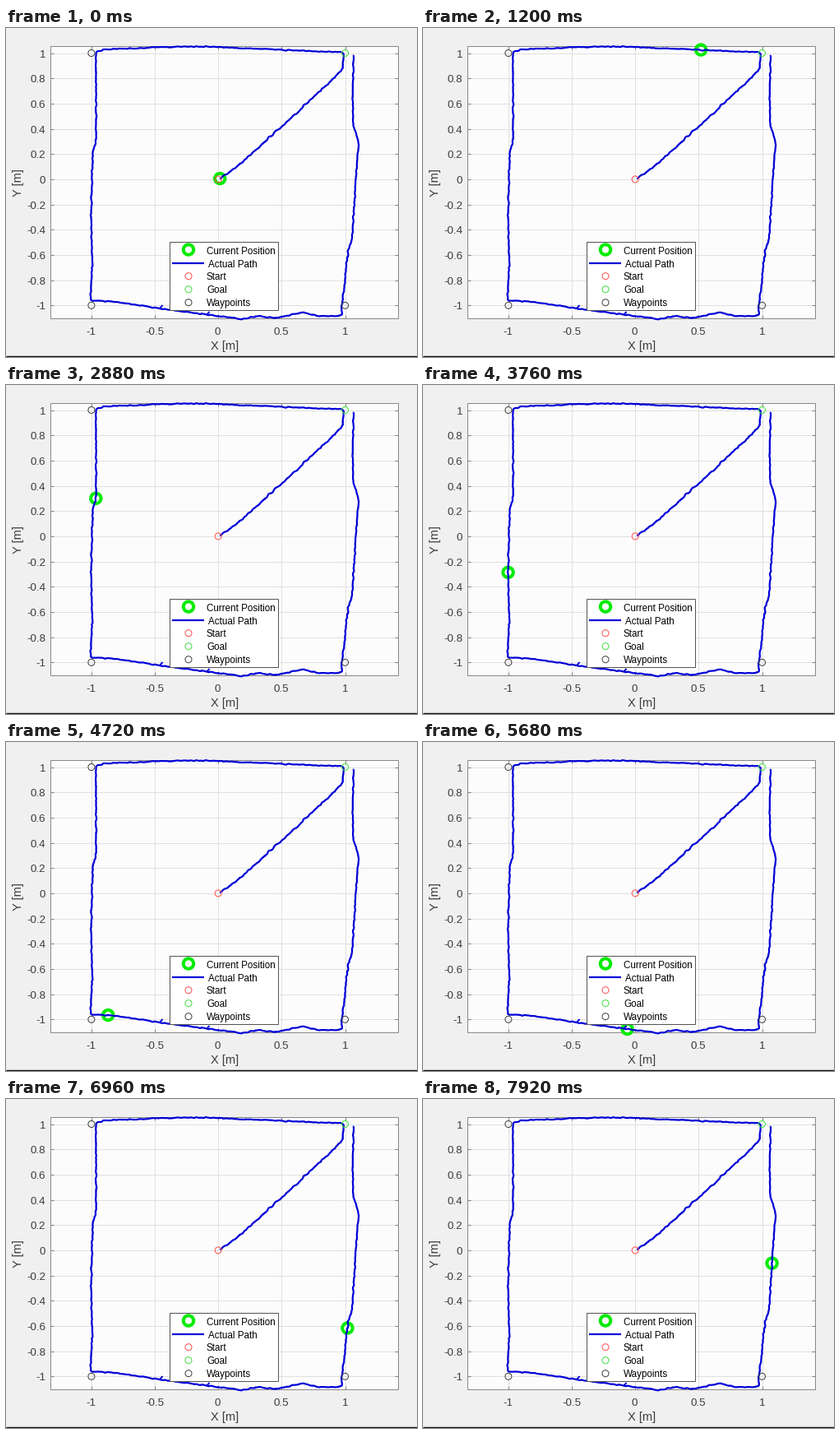
Animation of 500 by 400 pixels, one loop 8000 ms. Source, as a matplotlib script:

```python
import numpy as np
import matplotlib.pyplot as plt
from matplotlib.animation import FuncAnimation
from matplotlib.patches import Circle, Rectangle

W, H, DPI = 500, 400, 100
FRAMES, INTERVAL = 100, 80
PT = 72 / DPI  # points per pixel
GREEN, BLUE, INK = "#00eb00", "#0000d8", "#3c3c3c"
LEFT, TOP, RIGHT, BOTTOM = 53.5, 21.5, 476.5, 352.5

plt.rcParams["font.family"] = "Liberation Sans"
fig = plt.figure(figsize=(W / DPI, H / DPI), dpi=DPI, facecolor="#f0f0f0")
ax = fig.add_axes([0, 0, 1, 1])
ax.set(xlim=(0, W), ylim=(H, 0))
ax.axis("off")


def to_px(x, y):
    return 257.7 + 154.3 * x, 183.4 - 153.4 * y


def line(xs, ys, color, width, z):
    ax.plot(xs, ys, color=color, lw=width * PT, zorder=z,
            solid_capstyle="butt", solid_joinstyle="round")


def box(x0, y0, x1, y1, fill, edge, z):
    ax.add_patch(Rectangle((x0, y0), x1 - x0, y1 - y0, fc=fill, ec=edge,
                           lw=PT, zorder=z))


def ring(x, y, radius, color, width, z):
    return ax.add_patch(Circle((x, y), radius, fill=False, ec=color,
                               lw=width * PT, zorder=z))


def position_ring(x, y, z):
    return ring(x, y, 6.2, GREEN, 4, z)


def waypoint(x, y, color):
    px, py = to_px(x, y)
    ring(px + 0.5, py + 0.5, 4, color, 1, 7)


def label(x, y, text, size, color=INK, z=2, **kw):
    ax.text(x, y, text, fontsize=size * PT, color=color, zorder=z, **kw)


def draw_axes():
    box(LEFT, TOP, RIGHT, BOTTOM, "#fcfcfc", "none", 0)
    for v in np.arange(-2, 3) / 2:
        x = np.floor(to_px(v, 0)[0]) + 0.5
        line([x, x], [TOP, BOTTOM], "#e0e0e0", 1, 1)
        for y, step in ((TOP, 4), (BOTTOM, -4)):
            line([x, x], [y, y + step], "#808080", 1, 2)
        label(x, 373, f"{v:g}", 13.4, ha="center")
    for v in np.arange(-5, 6) / 5:
        y = np.floor(to_px(0, v)[1]) + 0.5
        line([LEFT, RIGHT], [y, y], "#e0e0e0", 1, 1)
        for x, step in ((LEFT, 4), (RIGHT, -4)):
            line([x, x + step], [y, y], "#808080", 1, 2)
        label(48.3, y + 5.3, f"{v:g}", 13.4, ha="right")
    box(LEFT, TOP, RIGHT, BOTTOM, "none", "#888888", 2)
    label(266.5, 391, "X [m]", 14.6, ha="center")
    label(14.7, 188, "Y [m]", 14.6, ha="center", va="center", rotation=90)
    line([0, W], [399.3, 399.3], "#101010", 1.4, 2)


def draw_legend():
    box(198.5, 259.5, 330.5, 342.5, "white", "#555555", 10)
    position_ring(222, 269.5, 11)
    line([202, 241], [285.5, 285.5], BLUE, 2.2, 11)
    for i, color in enumerate(("#ff5050", "#40e040", "#404040")):
        ring(222, 301.7 + 16 * i, 4, color, 1, 11)
    names = "Current Position", "Actual Path", "Start", "Goal", "Waypoints"
    for i, name in enumerate(names):
        label(246 if i == 1 else 244, 274.7 + 15.9 * i, name, 11.6,
              "black", 11)


def driven_path():
    """Legs of the route, one point per pixel, with softened corners."""
    legs = (
        [(259, 183), (281, 168), (340, 114.5), (402, 57), (409.5, 48)],
        [(410, 29), (262, 23), (218, 22), (118, 25.5), (109, 28)],
        [(109, 138), (105, 152), (103, 225), (104.5, 290), (102, 331)],
        [(125, 331.5), (190, 341), (287, 353.5), (306, 350), (328, 352),
         (360, 345), (376, 349.5), (407, 349.5)],
        [(416, 268), (420, 260), (427, 155), (429, 140), (422, 117),
         (421, 80), (422.5, 31)])
    corners = np.concatenate(legs) + 0.5
    dist = np.r_[0, np.cumsum(np.hypot(*np.diff(corners, axis=0).T))]
    s = np.arange(dist[-1])
    soft = [np.convolve(np.pad(np.interp(s, dist, c), 3, mode="edge"),
                        np.ones(7) / 7, "valid") for c in corners.T]
    return np.column_stack(soft)


def draw_route(path):
    rng = np.random.default_rng(4)
    rough = np.convolve(rng.normal(0, 0.6, len(path)), np.ones(4) / 4, "same")
    line(*(path + rough[:, None]).T, BLUE, 2.2, 5)
    for x in (189, 218, 246):  # small kinks along the bottom
        y = 341 + 0.14 * (x - 189)
        line([x - 2, x + 1.5], [y, y - 4], BLUE, 2, 5)


draw_axes()
draw_legend()
path = driven_path()
draw_route(path)
waypoint(0, 0, "#ff5050")
waypoint(1, 1, "#40e040")
for corner in ((-1, 1), (-1, -1), (1, -1)):
    waypoint(*corner, "#404040")
marker = position_ring(*path[0], 4)

# Where the robot changes speed: (time in ms, x, y).
pace = np.array([
    (0, 259, 183), (1200, 338.5, 26.5), (1920, 109.5, 96), (3520, 104, 165),
    (3760, 103, 228), (5680, 248, 350), (6960, 416, 278.5),
    (7920, 425, 199.5)])
progress = [np.argmin(np.hypot(*(path - p).T)) for p in pace[:, 1:]]


def update(frame):
    s = np.interp(frame * INTERVAL, pace[:, 0], progress)
    steps = np.arange(len(path))
    marker.center = tuple(np.interp(s, steps, c) for c in path.T)
    return (marker,)


anim = FuncAnimation(fig, update, frames=FRAMES, interval=INTERVAL,
                     repeat=True, repeat_delay=0, blit=False)
plt.show()
```
